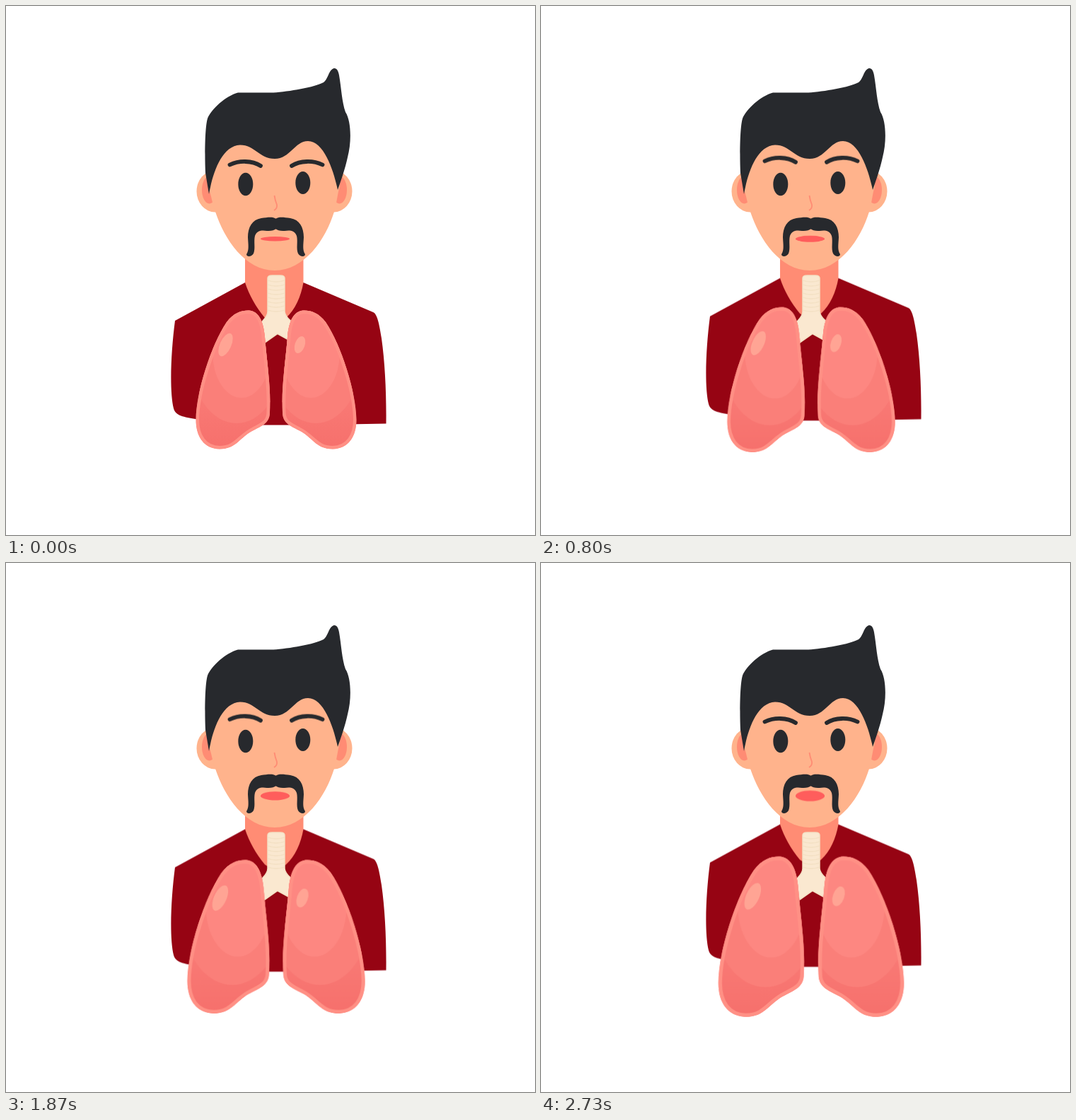
An HTML page for the animation above (2790 ms loop, 748 px wide and 748 px high).

```html
<!DOCTYPE html>
<html lang="en">
<head>
<meta charset="utf-8">
<title>Breathing</title>
<style>
  html, body { margin: 0; width: 100%; height: 100%; overflow: hidden; background: #fff; }
  svg { display: block; width: 100%; height: 100%; }

  .dark { fill: #27292d; }
  .skin { fill: #ffb38c; }
  .blush { fill: #ff8c74; }
  .shirt { fill: #960413; }

  .shirt, .lungs, .brows, .eye, .lips { animation: 2790ms steps(42) infinite; }
  .shirt { animation-name: rise; }
  .lungs { animation-name: inhale; transform-origin: 382px 528.5px; }
  .brows { animation-name: lift; fill: none; stroke: #27292d; stroke-width: 5.8; stroke-linecap: round; }
  .eye { animation-name: squint; transform-box: fill-box; transform-origin: center; }
  .lips { animation-name: open; fill: #ff5d5c; transform-box: fill-box; transform-origin: center; }

  @keyframes rise { to { transform: translateY(-22px); } }
  @keyframes inhale { to { transform: scale(1.16); } }
  @keyframes open { to { transform: scaleY(2.4); } }
  @keyframes lift {
    0% { transform: none; animation-timing-function: steps(17); }
    40.476% { transform: translateY(-7.5px); animation-timing-function: steps(20); }
    88.095%, 100% { transform: none; }
  }
  @keyframes squint {
    0%, 42.857% { transform: none; animation-timing-function: steps(5); }
    54.762% { transform: scaleY(.86); animation-timing-function: steps(5); }
    66.667%, 100% { transform: none; }
  }
</style>
</head>
<body>
<svg viewBox="0 0 748 748">
  <defs>
    <path id="lung-shape" d="M343 430.500C357 431 364 445 366 468C369 505 375 540 373 575C373 590 361 594 350 600C331 609 326 626.500 302 626.500C280 626 268.500 609 268.500 585C269 545 290 480 312 447C322 434 332 430.500 343 430.500Z"/>
    <clipPath id="lung-clip"><use href="#lung-shape"/></clipPath>
    <linearGradient id="lung-fill" x1="0" y1="0" x2="0" y2="1">
      <stop offset=".4" stop-color="#fb807b"/>
      <stop offset="1" stop-color="#f6706c"/>
    </linearGradient>
    <g id="lung" clip-path="url(#lung-clip)">
      <use href="#lung-shape" fill="url(#lung-fill)"/>
      <ellipse cx="326" cy="503" rx="63" ry="87" fill="#fa7f79"/>
      <ellipse cx="333" cy="490" rx="41" ry="64" fill="#fd8781"/>
      <use href="#lung-shape" fill="none" stroke="#ff9085" stroke-width="9"/>
    </g>
    <path id="half-moustache" d="M382 301C377 297.500 370 299 361 300C348 302 342 313 342 327C342.500 338 344 345 340 351C340 355 347 355 350 350C353 343 350 333 352 325C355 317 362 317 369 318C375 318.500 379 317 382 315Z"/>
  </defs>

  <rect class="blush" x="338" y="340" width="82.500" height="112"/>

  <g class="skin">
    <ellipse cx="295.500" cy="262" rx="26" ry="29.500"/>
    <ellipse cx="463.500" cy="262" rx="26" ry="29.500"/>
  </g>
  <g class="blush">
    <ellipse cx="287.500" cy="260" rx="10.500" ry="19.500"/>
    <ellipse cx="471.500" cy="260" rx="10.500" ry="19.500"/>
  </g>
  <path class="skin" d="M286 170V258C291 268 291 278 296 291C309 330 338 374 380 374C422 374 452 330 464 291C468 278 468 268 472 255V170Z"/>
  <path class="dark" d="M287 266L282 236C281 215 281 172 285 159C290 146 311 127 328 122.500H378C400 121 436 115 449 108C456 103 456 90 464 88C468 88 470 92 471 98C474 115 475 136 480 150C488 162 489 192 483 214C479 232 474 246 469 260C464 235 450 191 427 191C408 191 402 216 380 216C358 216 352 196.500 331 196.500C304 198 292 238 287 266Z"/>

  <g class="brows">
    <path d="M316.500 224.500C330 218 348 218.500 360 226"/>
    <path d="M404 226C416 218.500 434 218 447.500 224.500"/>
  </g>
  <ellipse class="dark eye" cx="338.800" cy="252" rx="10.500" ry="16.300"/>
  <ellipse class="dark eye" cx="419.800" cy="250" rx="10.500" ry="16"/>
  <path d="M379.500 268Q380.500 275 383 281Q384 286 379 289" fill="none" stroke="#ff8c74" stroke-width="1.800"/>
  <g class="dark">
    <use href="#half-moustache"/>
    <use href="#half-moustache" transform="matrix(-1 0 0 1 763 0)"/>
  </g>
  <ellipse class="lips" cx="380.500" cy="329.300" rx="20.500" ry="3.200"/>

  <path class="shirt" d="M338 391L239 445C233 490 231 545 237 569C240 580 252 581 268 584L365 592.500H425L537.500 590.500C538 550 536 505 531 470C527 444 524 434 518 432.500L420.500 391C417 411 409 429 396 441Q381 452 366 441C353 425 344 409 338 391Z"/>

  <g stroke="#f4e1c5" stroke-width="1.500">
    <path fill="#fae8d0" d="M370 385Q370 381 376 381H388Q394 381 394 385V432C395 440 401 443 406 449L403 474L384 463.500L366 476L359 450C363 444 370 440 370 432Z"/>
    <path fill="none" d="M370 388q12 4 24 0m-24 6q12 4 24 0m-24 6q12 4 24 0m-24 6q12 4 24 0m-24 6q12 4 24 0m-24 6q12 4 24 0m-24 6q12 4 24 0m-24 6q12 4 24 0"/>
  </g>

  <g class="lungs">
    <use href="#lung"/>
    <use href="#lung" transform="matrix(-1 0 0 1 764 0)"/>
    <g fill="#ffa494">
      <ellipse cx="310.500" cy="479" rx="8" ry="17.500" transform="rotate(24 310.500 479)"/>
      <ellipse cx="415.500" cy="479" rx="7" ry="12.500" transform="rotate(19 415.500 479)"/>
    </g>
  </g>
</svg>
</body>
</html>
```
